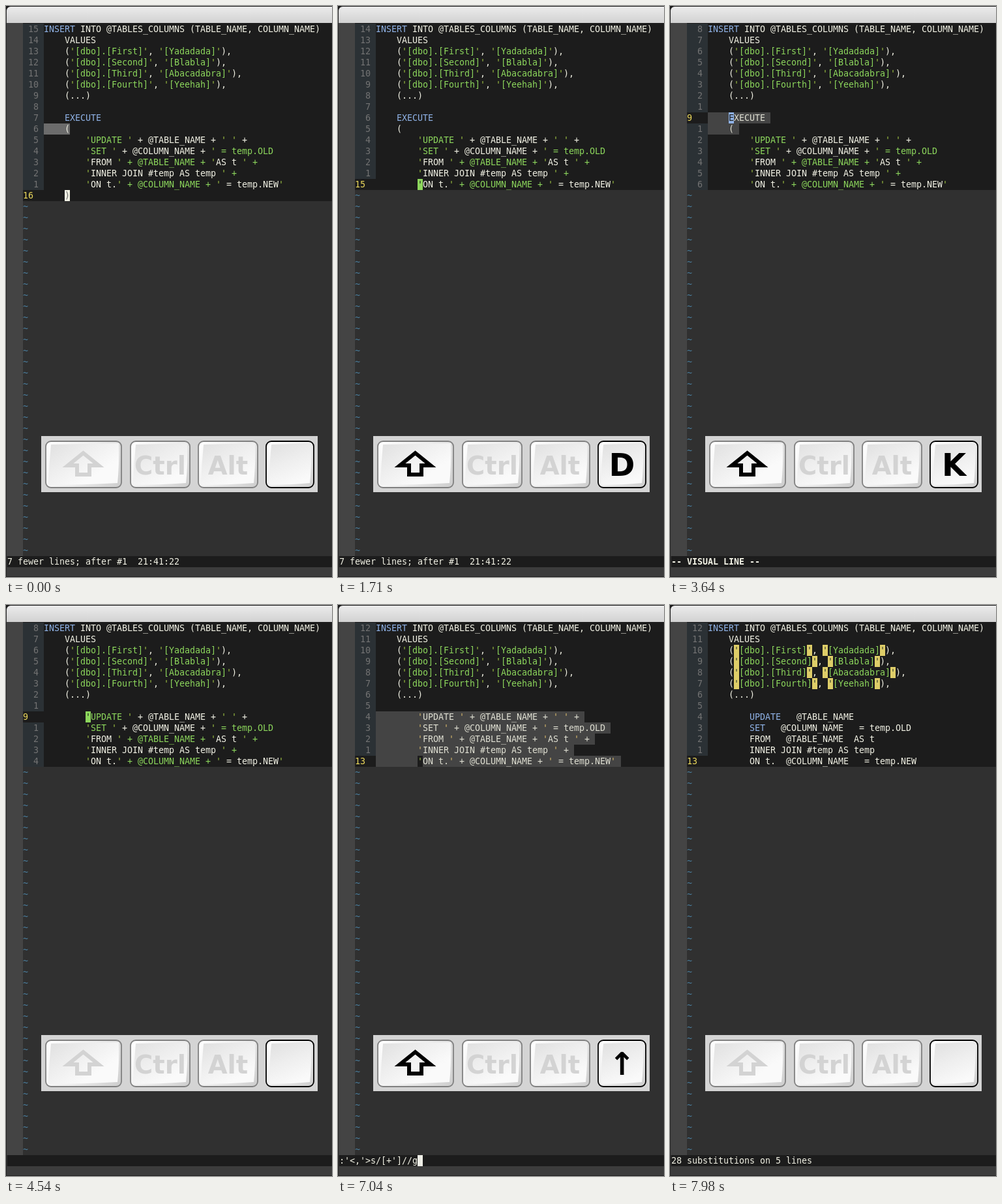
Recreate the animation shown at these times as an HTML page with a canvas. Size 500x875 px, loop 8000 ms.

```html
<!DOCTYPE html>
<html lang="en">
<head>
<meta charset="utf-8">
<title>Editing SQL with keystrokes</title>
<style>
  html, body { margin: 0; width: 100%; height: 100%; overflow: hidden; background: #303030; }
  canvas { display: block; }
</style>
</head>
<body>
<canvas id="stage" width="500" height="875"></canvas>
<script>
const ctx = document.getElementById('stage').getContext('2d');
const LOOP = 8000;
const CELL_W = 8, CELL_H = 17, TOP = 27, GUTTER_X = 26, CODE_X = 58, STATUS_ROW = 48;
const MONO = '13.33px "DejaVu Sans Mono", monospace';
const SANS = '"DejaVu Sans", sans-serif';
const COLOR = {
  text: '#f1f1e4', code: '#1c1c1c', empty: '#303030', fold: '#444444',
  gutter: '#2b3135', number: '#737373', current: '#ecd95c', tilde: '#4a7f9f',
  keyword: '#8fb2e6', string: '#8cd65c', quote: '#9fc443',
  visual: '#444444', visualText: '#dfdfd2', visualQuote: '#d8b96c',
  paren: '#6c6c6c', search: '#decd68', searchText: '#2e3a2c'
};

const FULL = `INSERT INTO @TABLES_COLUMNS (TABLE_NAME, COLUMN_NAME)
    VALUES
    ('[dbo].[First]', '[Yadadada]'),
    ('[dbo].[Second]', '[Blabla]'),
    ('[dbo].[Third]', '[Abacadabra]'),
    ('[dbo].[Fourth]', '[Yeehah]'),
    (...)

    EXECUTE
    (
        'UPDATE ' + @TABLE_NAME + ' ' +
        'SET ' + @COLUMN_NAME + ' = temp.OLD
        'FROM ' + @TABLE_NAME + 'AS t ' +
        'INNER JOIN #temp AS temp ' +
        'ON t.' + @COLUMN_NAME + ' = temp.NEW'
    )`.split('\n');
const OPEN = FULL.slice(0, 15);
const BARE = OPEN.filter((line, i) => i !== 8 && i !== 9);
const CLEAN = BARE.map((line, i) => i < 8 ? line : line.replace(/[+']/g, ''));
const VISUAL = '-- VISUAL LINE --';

// Each entry overrides part of the state from its time on.
const TIMELINE = [
  [0, { code: FULL, row: 15, on: true, key: '', shift: false, sel: null, cmd: false,
        search: false, status: '7 fewer lines; after #1  21:41:22' }],
  [240, { on: false }],
  [280, { on: true, key: 'G' }],
  [420, { row: 0 }],
  [770, { shift: true }],
  [930, { key: '' }],
  [1230, { key: 'G' }],
  [1270, { row: 15 }],
  [1540, { key: 'D' }],
  [1710, { code: OPEN, row: 14 }],
  [2230, { key: '', shift: false }],
  [2270, { on: false }],
  [2580, { on: true, key: '5' }],
  [2710, { key: 'K' }],
  [2750, { row: 9 }],
  [3270, { key: '' }],
  [3310, { shift: true }],
  [3410, { key: 'V' }],
  [3450, { sel: [9, 9], status: VISUAL }],
  [3600, { key: 'K' }],
  [3640, { row: 8, sel: [8, 9] }],
  [3960, { key: 'D' }],
  [4000, { code: BARE, sel: null, status: '' }],
  [4540, { key: '', shift: false }],
  [4580, { on: false }],
  [5150, { on: true }],
  [5630, { shift: true }],
  [5730, { key: 'V' }],
  [5770, { sel: [8, 8], status: VISUAL }],
  [5920, { key: 'G' }],
  [5960, { row: 12, sel: [8, 12] }],
  [6510, { key: '', shift: false }],
  [6590, { key: ':', shift: true }],
  [6630, { cmd: true, status: ":'<,'>" }],
  [7000, { key: '↑' }],
  [7040, { status: ":'<,'>s/[+']//g" }],
  [7380, { key: 'Enter' }],
  [7420, { code: CLEAN, sel: null, cmd: false, search: true, status: '28 substitutions on 5 lines' }],
  [7940, { key: '', shift: false }],
  [7980, { on: false }]
];

const stateAt = t => Object.assign({}, ...TIMELINE.filter(([at]) => at <= t).map(([, patch]) => patch));
const rowY = row => TOP + row * CELL_H;

function rect(color, x, y, w, h) {
  ctx.fillStyle = color;
  ctx.fillRect(x, y, w, h);
}

function print(str, x, row, color, bold = false) {
  ctx.font = (bold ? 'bold ' : '') + MONO;
  ctx.textAlign = 'left';
  ctx.fillStyle = color;
  [...str].forEach((ch, i) => { if (ch !== ' ') ctx.fillText(ch, x + i * CELL_W, rowY(row) + 13); });
}

function gradient(x0, y0, x1, y1, ...colors) {
  const g = ctx.createLinearGradient(x0, y0, x1, y1);
  colors.forEach((c, i) => g.addColorStop(i / (colors.length - 1), c));
  return g;
}

// Colours every character; strings may run over line ends.
function highlight(lines) {
  let inString = false;
  return lines.map(line => {
    const colors = [];
    for (const [token] of line.matchAll(/'|\w+|[^\w']/g)) {
      let color = inString ? COLOR.string : COLOR.text;
      if (token === "'") {
        color = COLOR.quote;
        inString = !inString;
      } else if (!inString && /^(INSERT|EXECUTE|UPDATE|SET)$/.test(token)) {
        color = COLOR.keyword;
      }
      for (const _ of token) colors.push(color);
    }
    return colors;
  });
}

function drawWindow() {
  rect('#303030', 0, 0, 500, 875);
  rect('#1a1a1a', 0, 0, 500, 27);
  ctx.fillStyle = gradient(0, 1, 0, 26, '#ebebeb', '#d2d2d2');
  ctx.beginPath();
  ctx.roundRect(1, 1, 520, 25, [6, 0, 0, 0]);
  ctx.fill();
  rect(COLOR.fold, 1, 26, 25, 817);
  rect(COLOR.code, 2, rowY(STATUS_ROW), 498, CELL_H);
  rect('#3c3c3c', 1, 860, 499, 14);
  rect('#222222', 0, 874, 500, 1);
  rect('#222222', 0, 6, 1, 869);
}

function drawCode(s) {
  const colors = highlight(s.code);
  const cursorCol = s.code[s.row].search(/\S/);
  const onParen = s.code[s.row].trim() === ')';

  s.code.forEach((line, row) => {
    const y = rowY(row), isCurrent = row === s.row;
    rect(COLOR.code, GUTTER_X, y, 500 - GUTTER_X, CELL_H);
    if (!isCurrent) rect(COLOR.gutter, GUTTER_X, y, 32, CELL_H);
    const number = isCurrent ? String(row + 1) : String(Math.abs(row - s.row)).padStart(3);
    print(number, GUTTER_X, row, isCurrent ? COLOR.current : COLOR.number);

    const selected = s.sel && row >= s.sel[0] && row <= s.sel[1];
    if (selected) rect(COLOR.visual, CODE_X, y, (line.length + 1) * CELL_W, CELL_H);

    [...line].forEach((ch, col) => {
      const x = CODE_X + col * CELL_W, isCursor = isCurrent && col === cursorCol;
      let fg = colors[row][col], bg = null;
      if (selected && !isCursor) fg = ch === "'" ? COLOR.visualQuote : COLOR.visualText;
      if (selected && isCursor) bg = COLOR.code;
      if (s.search && ch === "'") [fg, bg] = [COLOR.searchText, COLOR.search];
      if (onParen && (isCursor || line.trim() === '(')) [fg, bg] = [COLOR.text, COLOR.paren];
      if (isCursor && s.on && !s.cmd) {
        [fg, bg] = [bg || COLOR.code, fg === COLOR.quote ? COLOR.string : fg];
      }
      if (bg) rect(bg, x, y, CELL_W, CELL_H);
      print(ch, x, row, fg);
    });
  });

  for (let row = s.code.length; row < STATUS_ROW; row++) print('~', GUTTER_X, row, COLOR.tilde);
}

function drawStatus(s) {
  print(s.status, 2, STATUS_ROW, COLOR.text, s.status === VISUAL);
  if (s.cmd) rect('#eeeee6', 2 + s.status.length * CELL_W, rowY(STATUS_ROW), CELL_W, CELL_H);
}

function drawKey(x, w, border) {
  const y = 667, h = 71;
  ctx.beginPath();
  ctx.roundRect(x, y, w, h, 8);
  ctx.fillStyle = gradient(x, y, x + w, y + h, '#ffffff', '#eeeeee', '#cccccc');
  ctx.fill();
  ctx.lineWidth = 1.8;
  ctx.strokeStyle = border;
  ctx.stroke();
  ctx.beginPath();
  ctx.moveTo(x + 8, y + 5);
  ctx.lineTo(x + w - 4, y + 3);
  ctx.quadraticCurveTo(x + w - 3, y + h / 2, x + w - 6, y + h - 7);
  ctx.quadraticCurveTo(x + w / 2, y + h - 4, x + 4, y + h - 4);
  ctx.quadraticCurveTo(x + 5, y + h / 2, x + 8, y + 5);
  ctx.fillStyle = gradient(x, y, x + w * 0.4, y + h, '#dedede', '#ededed', '#fafafa');
  ctx.fill();
}

function label(str, x, y, size, color) {
  ctx.font = `bold ${size}px ${SANS}`;
  ctx.textAlign = 'center';
  ctx.fillStyle = color;
  ctx.fillText(str, x, y);
}

function drawShiftArrow(color) {
  ctx.beginPath();
  [[118.5, 685], [142, 704], [128, 704], [128, 718], [109, 718], [109, 704], [95, 704]]
    .forEach(([x, y]) => ctx.lineTo(x, y));
  ctx.closePath();
  ctx.lineWidth = 6;
  ctx.strokeStyle = color;
  ctx.stroke();
}

function drawKeys(s) {
  const dim = '#d3d3d3', wide = s.key.length > 1, width = wide ? 116 : 73;
  rect('#d4d4d4', 54, 659, 351 + width, 86);
  drawKey(61, 116, '#808080');
  drawShiftArrow(s.shift ? '#000' : dim);
  drawKey(191, 91, '#808080');
  label('Ctrl', 236.5, 718, 38.5, dim);
  drawKey(295, 91, '#808080');
  label('Alt', 340.5, 718, 38.5, dim);
  drawKey(399, width, '#000');
  label(s.key, 399 + width / 2, wide ? 714 : 720, wide ? 30 : 48, '#000');
}

function frame(now) {
  const s = stateAt(now % LOOP);
  drawWindow();
  drawCode(s);
  drawStatus(s);
  drawKeys(s);
  requestAnimationFrame(() => frame(performance.now()));
}
frame(0);
</script>
</body>
</html>
```
